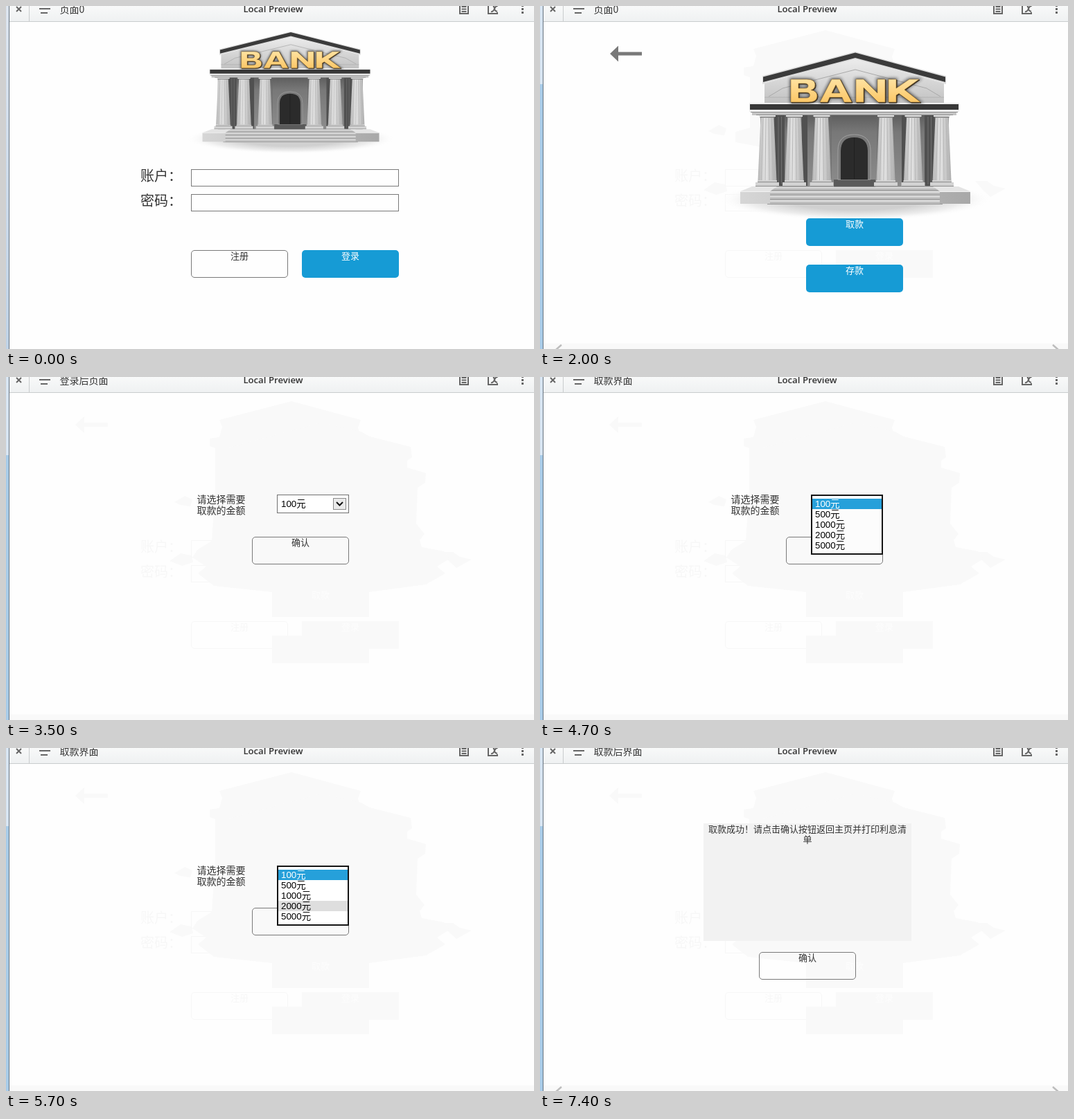
An HTML page for the animation above (8000 ms loop, 762 by 496 pixels).

```html
<!DOCTYPE html>
<html lang="zh-CN">
<head>
<meta charset="utf-8">
<title>Local Preview</title>
<style>
  html, body { margin: 0; width: 100%; height: 100%; overflow: hidden; background: #fefefe; }
  svg { display: block; width: 762px; height: 496px; }
  text { font-family: "Noto Sans CJK SC", "Noto Sans CJK", sans-serif; font-size: 13px; fill: #333; }
  .mid { text-anchor: middle; }
  .label { font-size: 20px; font-weight: 300; }
  .hint { font-size: 14px; }
  .opt { font-family: "Liberation Sans", "Noto Sans CJK SC", sans-serif; font-size: 13.33px; fill: #000; }
  .head { font: 600 13.2px "Open Sans", sans-serif; }
  .line { fill: none; stroke: #797979; }
  .blue { fill: #169bd5; }
  .on { fill: #fff; }
  .trace { fill: #f9f9f9; }
  .trace text { fill: #f7f7f7; }
  .trace .line { stroke: #f7f7f7; }
  .trace .on { fill: #fdfdfd; }
</style>
</head>
<body>
<svg viewBox="0 0 762 496">
  <defs>
    <linearGradient id="bar" x2="0" y2="1"><stop stop-color="#f8f9f9"/><stop offset="1" stop-color="#eff1f2"/></linearGradient>
    <linearGradient id="edgeA" x2="0" y2="1"><stop stop-color="#dce4ee"/><stop offset="1" stop-color="#bfd2e6"/></linearGradient>
    <linearGradient id="gold" x2="0" y2="1"><stop stop-color="#ffe2a0"/><stop offset="1" stop-color="#fbc767"/></linearGradient>
    <linearGradient id="stone" x2="1" y2="0"><stop stop-color="#b4b4b4"/><stop offset=".4" stop-color="#e6e6e6"/><stop offset="1" stop-color="#acacac"/></linearGradient>
    <linearGradient id="wall" x2="0" y2="1"><stop stop-color="#5c5c5c"/><stop offset=".25" stop-color="#787878"/><stop offset="1" stop-color="#8c8c8c"/></linearGradient>
    <linearGradient id="gable" x2="0" y2="1"><stop stop-color="#ececec"/><stop offset="1" stop-color="#c2c2c2"/></linearGradient>
    <linearGradient id="block" x2="1" y2="0"><stop stop-color="#d6d6d6"/><stop offset="1" stop-color="#a8a8a8"/></linearGradient>
    <radialGradient id="shade"><stop offset=".5" stop-color="#d0d0d0"/><stop offset=".8" stop-color="#eee"/><stop offset="1" stop-color="#fefefe" stop-opacity="0"/></radialGradient>
    <filter id="soft" x="-10%" y="-30%" width="120%" height="160%"><feGaussianBlur stdDeviation="2"/></filter>

    <g id="column">
      <path d="M-9.500 161H9.500L13.500 252H-13.500Z" fill="url(#stone)"/>
      <path d="M-6 162L-8.500 252M-2 162L-3 252M2 162L3 252M6 162L8.500 252" stroke="#b5b5b5" fill="none"/>
      <path d="M-12 157H12V160H-12Z" fill="#e6e6e6"/>
      <path d="M-14 252H14V255H17V261H-17V255H-14Z" fill="#d2d2d2"/>
      <path d="M-17 260.500H17M-14 254.500H14M-11 161H11" stroke="#8d8d8d"/>
    </g>

    <g id="bank">
      <ellipse cx="455" cy="280" rx="196" ry="30" fill="url(#shade)"/>
      <path d="M318 156H590V262H318Z" fill="url(#wall)"/>
      <path d="M337 157H353V260H337ZM378 157H386V260H378ZM522 157H530V260H522ZM555 157H571V260H555Z" fill="#505050"/>
      <path d="M344 160V258M348.500 160V258M560 160V258M564.500 160V258" stroke="#707070"/>
      <path d="M420 157V250M487 157V250" stroke="#686868"/>
      <path d="M424 251H484V262H424Z" fill="#5a5a5a"/>
      <path d="M430 251V209Q430 186 453.500 186Q477 186 477 209V251Z" fill="#787878" stroke="#a2a2a2"/>
      <path d="M434 251V210Q434 190 453.500 190Q473 190 473 210V251Z" fill="#2b2b2b"/>
      <path d="M453.500 191V250" stroke="#202020"/>
      <g id="columns"></g>

      <path d="M332 262H577V268H581V287H328V268H332Z" fill="#bebebe"/>
      <path d="M332 262.500H577M330 269H579M328 275.500H581M328 282H581" stroke="#dedede" stroke-width="2"/>
      <path d="M331 266.500H578M329 273H580M328 279.500H581M328 286.500H581" stroke="#999"/>
      <path d="M289 268L306 261H342L332 268ZM621 268L604 261H567L577 268Z" fill="#e4e4e4"/>
      <path d="M289 268H332V286H289ZM577 268H621V286H577Z" fill="url(#block)"/>
      <path d="M289 268.500H332M577 268.500H621" stroke="#f2f2f2"/>

      <path d="M324 112L455 77L583 112V140H324Z" fill="url(#gable)"/>
      <path d="M330 131L350 119L455 92L558 119L578 131" fill="none" stroke="#a9a9a9"/>
      <path d="M324 132H583" stroke="#b2b2b2"/>
      <path d="M321 113L455 77L586 113V101L455 66L321 101Z" fill="#dedede"/>
      <path d="M322 110L455 75L585 110V102.500L455 67.500L322 102.500Z" fill="#3b3b3b"/>
      <path d="M302 140H605V153H302Z" fill="#f0f0f0"/>
      <path d="M303 142H604V150H303Z" fill="#383838"/>
      <path d="M306 153H601V158H306Z" fill="#c4c4c4"/>
      <path d="M304 153.500H603M312 157.500H596" stroke="#8c8c8c"/>

      <g id="sign" fill-rule="evenodd">
        <path d="M362 139V106H385Q397 106 397 114Q397 120 391 121.500Q400 123 400 130Q400 139 387 139ZM373 112V119H382Q387 119 387 115.500Q387 112 382 112ZM373 125V133H384Q389.500 133 389.500 129Q389.500 125 384 125Z"/>
        <path d="M404 139L421 106H433L450 139H439L436 132H418L415 139ZM427 114L421 126H433Z"/>
        <path d="M456 139V106H467L487 126V106H498V139H488L467 118V139Z"/>
        <path d="M503 139V106H514V119L533 106H547L526 121L549 139H535L518 126.500L514 129V139Z"/>
      </g>
    </g>
  </defs>

  <rect width="762" height="496" fill="#fefefe"/>

  <g id="trace1" class="trace">
    <path d="M412 35L512 62L508 73L512 88H527V100L519 106V176L540 182V197L500 204H320L282 197V182L303 176V103L294 100V89L308 87L312 72L308 62Z"/>
    <path d="M243 181L258 172L269 177L266 187L252 185Z"/>
    <path d="M236 266L252 255L268 258L270 268L254 273ZM628 253H645L655 260L672 264L650 276L641 268Z"/>
    <g class="login"></g>
    <rect x="427" y="353" width="140" height="40"/>
    <text class="mid on" x="497" y="366">登录</text>
    <path d="M5 488H762V496H5Z"/>
  </g>

  <g id="trace2" class="trace">
    <path d="M455 66L512 79L525 86L584 101L586 116L579 121V131L606 139L605 153L594 160L592 212L604 227L597 236L600 246L632 252L640 263L622 274L634 284L606 300L524 311H384L300 302L277 284L289 274L269 261L276 250L297 237L302 160V102H322Z"/>
    <path d="M100 69L113 57V66H147V72H113V81Z"/>
    <path d="M384 307H524V347H384ZM384 374H524V414H384Z"/>
    <text class="mid on" x="454" y="320">取款</text>
  </g>

  <g id="home">
    <use href="#bank" transform="matrix(.768 0 0 .724 61.6 -10.8)"/>
    <g class="login"></g>
    <rect class="blue" x="427" y="353" width="140" height="40" rx="5"/>
    <text class="mid on" x="497" y="366">登录</text>
  </g>

  <g id="menu">
    <use href="#bank"/>
    <path d="M101 69L113 57.500V66.500H147V71.500H113V80.500Z" fill="#797979"/>
    <rect class="blue" x="384" y="307" width="140" height="40" rx="5"/>
    <rect class="blue" x="384" y="374" width="140" height="40" rx="5"/>
    <text class="mid on" x="454" y="320">取款</text>
    <text class="mid on" x="454" y="387">存款</text>
  </g>

  <g id="form">
    <text class="hint" x="275.500" y="182">请选择需要</text>
    <text class="hint" x="275.500" y="198">取款的金额</text>
    <rect class="line" x="355.500" y="231.500" width="139" height="39" rx="4.500"/>
    <text class="mid" x="425" y="244">确认</text>
    <rect x="391.500" y="170.500" width="103" height="26" fill="#fff" stroke="#707070"/>
    <rect id="focus" x="396" y="176" width="75" height="15" fill="#26a0da"/>
    <text id="value" class="opt" x="397" y="188"></text>
    <rect x="472.500" y="175.500" width="18" height="16" fill="#eaeaea" stroke="#8a8a8a"/>
    <path d="M477 181L481.500 185.500L486 181" fill="none" stroke="#111" stroke-width="2"/>
    <g id="popup">
      <rect id="sheet" x="392" y="171" width="102" height="85" stroke="#141414" stroke-width="2"/>
      <rect id="hover" x="393" width="100" height="15" fill="#dedede"/>
      <rect x="393" y="176" width="100" height="15" fill="#26a0da"/>
      <g id="options"></g>
    </g>
  </g>

  <g id="done">
    <rect x="236" y="109" width="300" height="170" fill="#f2f2f2"/>
    <text class="mid" x="386" y="122">取款成功！请点击确认按钮返回主页并打印利息清</text>
    <text class="mid" x="386" y="137">单</text>
    <rect class="line" x="316.500" y="295.500" width="139" height="39" rx="4.500"/>
    <text class="mid" x="386" y="308">确认</text>
  </g>

  <path id="chevrons" d="M31 490L23 497M740 490L748 497" fill="none" stroke="#bdbdbd" stroke-width="2.500"/>

  <g id="toolbar">
    <rect x="5" width="757" height="22" fill="url(#bar)"/>
    <path d="M5 22.500H762M33.500 0V22" stroke="#c9cccd"/>
    <path d="M15 1L22 8M22 1L15 8" stroke="#666" stroke-width="2"/>
    <path d="M48 4H64M50 10H60" stroke="#666" stroke-width="2"/>
    <text id="title" class="hint" x="77.500" y="9.500"></text>
    <text class="mid head" x="385.500" y="9">Local Preview</text>
    <g fill="none" stroke="#666" stroke-width="2">
      <path d="M655 -2V11H667V-2M657.500 1H664.500M657.500 4.500H664.500M657.500 8H664.500"/>
      <path d="M696 -2V11H709V9M700 8Q703 9 705 4T710 0M703 0Q705 1 705 4T709 8"/>
    </g>
    <path d="M744 -2H747V1H744ZM744 3H747V6H744ZM744 8H747V11H744Z" fill="#666"/>
  </g>

  <rect id="edge1" width="4" height="496" fill="url(#edgeA)"/>
  <g id="edge2">
    <rect width="4" height="113" fill="#d7e4f1"/>
    <rect y="113" width="4" height="383" fill="#a8cbe8"/>
  </g>
  <path d="M4.500 0V496" stroke="#65727f"/>
</svg>

<script>
const $ = id => document.getElementById(id);
const LOOP = 8000;
const AMOUNTS = [100, 500, 1000, 2000, 5000].map(n => n + '元');
const TITLES = [[0, '页面0'], [2100, '登录后页面'], [3600, '取款界面'], [7400, '取款后界面']];
const HOVERS = [[0, 0], [5000, 1], [5100, 2], [5200, 3], [5400, 4], [5700, 3]];

$('columns').innerHTML = [328, 367, 406.5, 499, 538.5, 580]
  .map(x => `<use href="#column" x="${x}"/>`).join('');

// Sign letters: blurred shadow, dark side, gold face
const letters = $('sign').innerHTML;
$('sign').innerHTML = `
  <g filter="url(#soft)" fill="#222" stroke="#222" stroke-width="3" opacity=".75">${letters}</g>
  <g transform="translate(1 1)" fill="#3d3325" stroke="#3d3325">${letters}</g>
  <g fill="url(#gold)" stroke="#8a6428" stroke-width=".5">${letters}</g>`;

document.querySelectorAll('.login').forEach(g => g.innerHTML = `
  <text class="label" x="194" y="253">账户：</text>
  <text class="label" x="194" y="289">密码：</text>
  <rect class="line" x="267.500" y="236.500" width="299" height="24"/>
  <rect class="line" x="267.500" y="272.500" width="299" height="24"/>
  <rect class="line" x="267.500" y="353.500" width="139" height="39" rx="4.500"/>
  <text class="mid" x="337" y="366">注册</text>`);

$('options').innerHTML = AMOUNTS
  .map((s, i) => `<text class="opt" style="fill:${i ? '#000' : '#fff'}" x="397" y="${188 + 15 * i}">${s}</text>`)
  .join('');

const show = (id, on) => $(id).style.display = on ? '' : 'none';
const latest = (steps, t) => steps.filter(s => s[0] <= t).pop()[1];

function render(t) {
  const within = (a, b) => t >= a && t < b;
  show('edge1', t < 1500);
  show('edge2', t >= 1500);
  show('home', t < 2000);
  show('trace1', t >= 2000);
  show('menu', within(2000, 3500));
  show('trace2', t >= 3500);
  show('form', within(3500, 7300));
  show('done', t >= 7300);
  show('chevrons', within(2000, 3500) || t >= 7300);
  $('title').textContent = latest(TITLES, t);

  const focused = within(6100, 6800);
  show('focus', focused);
  $('value').textContent = AMOUNTS[t < 6100 ? 0 : 3];
  $('value').style.fill = focused ? '#fff' : '#000';

  show('popup', within(4700, 6200));
  $('popup').style.opacity = t < 6100 ? 1 : .3;
  $('sheet').style.fill = t < 4800 ? '#fcfcfc' : '#fff';
  $('hover').setAttribute('y', 176 + 15 * latest(HOVERS, t));
}

function tick() {
  render(performance.now() % LOOP);
  requestAnimationFrame(tick);
}
tick();
</script>
</body>
</html>
```
